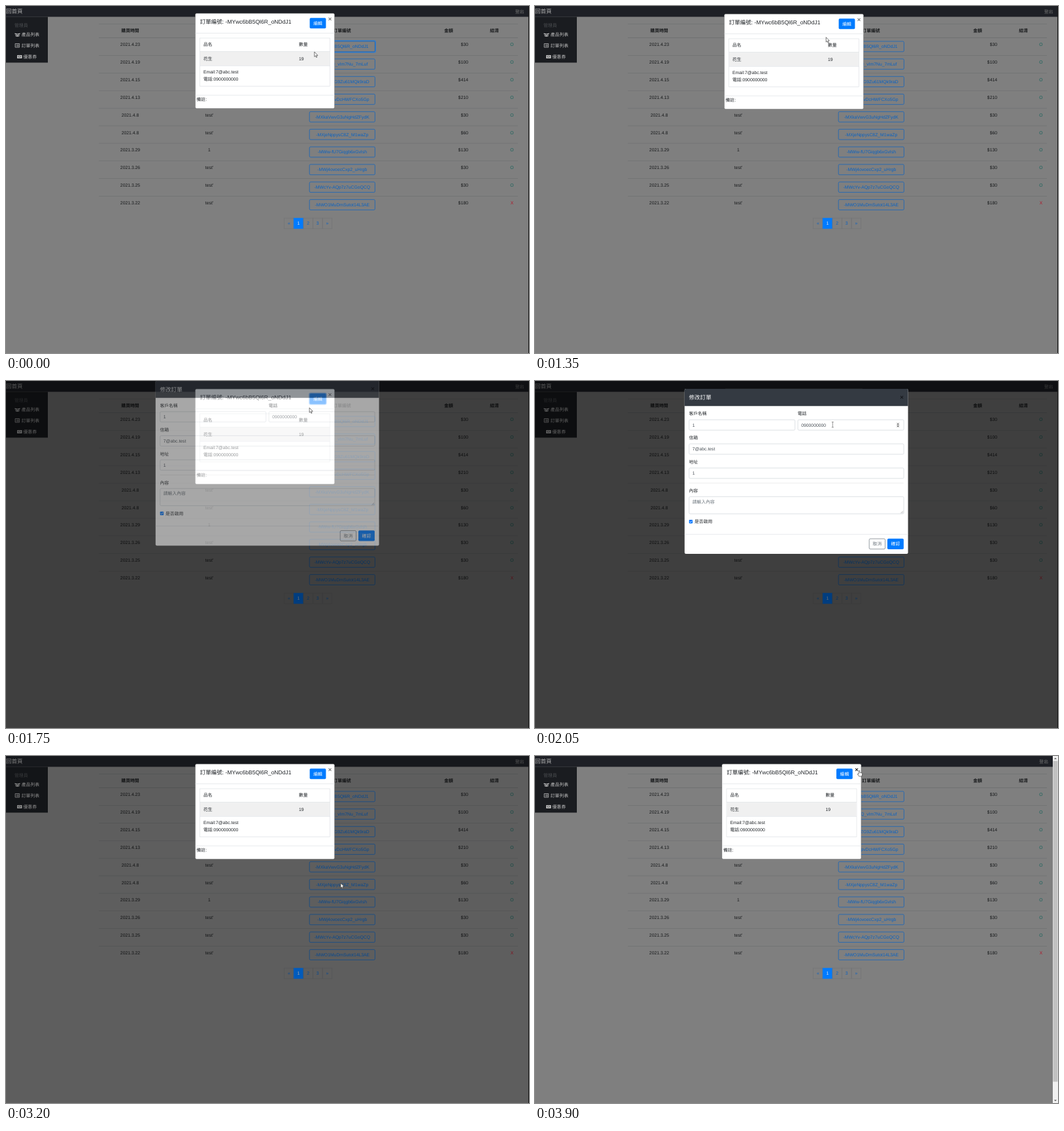
Recreate the animation shown at these times as an HTML page. Size 800 by 530 pixels, loop 3950 ms.

```html
<!DOCTYPE html>
<html lang="zh-Hant">
<head>
<meta charset="utf-8">
<title>訂單列表</title>
<style>
  html, body { margin: 0; width: 100%; height: 100%; overflow: hidden; background: #7f7f7f; }
  svg { display: block; width: 800px; height: 530px; }
  text { font: 6.82px 'Liberation Sans', 'Noto Sans CJK TC', 'Noto Sans CJK', sans-serif; text-rendering: geometricPrecision; }
</style>
</head>
<body>
<svg id="stage" viewBox="0 0 800 530"></svg>
<script>
const LOOP = 3950;
const BLUE = '#007bff', DIM_BLUE = '#0862c4', INK = '#212529', PAGE_INK = '#17191b';
const EMAIL = '7@abc.test', PHONE = '0900000000';

function add(parent, tag, attrs = {}) {
  const node = document.createElementNS('http://www.w3.org/2000/svg', tag);
  for (const key in attrs) node.setAttribute(key, attrs[key]);
  return parent.appendChild(node);
}
const group = parent => add(parent, 'g');
const rect = (parent, x, y, width, height, fill, attrs) =>
  add(parent, 'rect', { x, y, width, height, fill, ...attrs });
const box = (parent, x, y, w, h, stroke, fill = 'none') =>
  rect(parent, x, y, w, h, fill, { stroke, 'stroke-width': .7, rx: 1.7 });
const hline = (parent, x, y, w, color, h = .7) => rect(parent, x, y, w, h, color);
const path = (parent, d, attrs) => add(parent, 'path', { d, ...attrs });

// y is the vertical centre of the glyphs
function label(parent, x, y, string, fill = INK, { size = 6.82, anchor = 'start', weight = 400 } = {}) {
  const node = add(parent, 'text', { x, y: y + size * .36, fill, 'text-anchor': anchor });
  node.style.fontSize = size + 'px';
  node.style.fontWeight = weight;
  node.textContent = string;
  return node;
}
const middle = { anchor: 'middle' }, bold = { anchor: 'middle', weight: 700 };
const medium = { anchor: 'middle', weight: 500 };

const stage = document.getElementById('stage');
const page = group(stage);
rect(page, 0, 0, 800, 530, '#7f7f7f');

// Order table
const orders = [
  ['2021.4.23', '', '-MYwc6bB5Ql6R_oNDdJ1', 30],
  ['2021.4.19', '', '-MYbfCQ_vIm7Nu_7mLuf', 100],
  ['2021.4.15', '', '-MYKzAZG9Zu61MQk9raD', 414],
  ['2021.4.13', '', '-MY8s_tpvDcHWFCXo5Gp', 210],
  ['2021.4.8', "test'", '-MXkaVwvG3uNgHdZFydK', 30],
  ['2021.4.8', "test'", '-MXjeNppysC8Z_M1waZp', 60],
  ['2021.3.29', '1', '-MWw-fU7Giqgb6xGvIsh', 130],
  ['2021.3.26', "test'", '-MWj4ovoecCxp2_uHrgb', 30],
  ['2021.3.25', "test'", '-MWcYv-AQp7z7uCGoQCQ', 30],
  ['2021.3.22', "test'", '-MWO1MuDmSutot14L3AE', 180],
];
const LINE = '#6f7172';
hline(page, 142, 27, 641, LINE);
hline(page, 142, 48, 641, LINE, 1);
[['購買時間', 190], ['訂單編號', 514], ['金額', 677], ['結清', 747]]
  .forEach(([title, x]) => label(page, x, 38, title, PAGE_INK, bold));
const rowFocus = rect(page, 463.3, 53, 102, 17.8, 'none', { rx: 2, stroke: BLUE, 'stroke-width': 1.5 });
orders.forEach(([date, buyer, id, price], i) => {
  const y = 58.8 + 26.85 * i;
  const paid = i < 9;
  if (i) hline(page, 142, y - 10.4, 641, LINE);
  label(page, 190, y, date, PAGE_INK, middle);
  label(page, 311, y, buyer, PAGE_INK, middle);
  box(page, 464.2, y - 4.8, 100.2, 15.8, DIM_BLUE);
  label(page, 514.3, y + 3.1, id, DIM_BLUE, middle);
  label(page, 707, y, '$' + price, PAGE_INK, { anchor: 'end' });
  label(page, 774, y, paid ? 'O' : 'X', paid ? '#14635a' : '#b0182a', middle);
});

// Pagination
['«', '1', '2', '3', '»'].forEach((mark, i) => {
  const active = i === 1, x = 425.5 + 14.65 * i;
  rect(page, x, 324, 14.65, 16, active ? BLUE : 'none', { stroke: active ? BLUE : '#707274', 'stroke-width': .6 });
  label(page, x + 7.3, 332, mark, active ? '#e8e8e8' : DIM_BLUE, middle);
});

// Navigation
rect(page, 0, 0, 800, 16.5, '#1e2026');
label(page, 0, 8.3, '回首頁', '#aaa', { size: 8.53 });
const logout = label(page, 785.5, 8.3, '登出', '#777', middle);
rect(page, 0, 16.5, 64, 70, '#1a1c20');
label(page, 13, 29.5, '管理員', '#4b4d50');
label(page, 23.8, 43.5, '產品列表', '#c4c4c4', { weight: 500 });
label(page, 23.8, 60.5, '訂單列表', '#c4c4c4', { weight: 500 });
label(page, 26.5, 77.5, '優惠券', '#c4c4c4', { weight: 500 });
path(page, 'M13.5 41.5l4 1 4-1v1.6l-3 1-1-1-1 1-3-1zM14.5 44.5l2 .6 1-1 1 1 2-.6v1.5l-3 .8-3-.8z', { fill: '#c4c4c4' });
path(page, 'M14 57.5h6.6v5.6H14zM15.2 59h.9m.8 0h2.6M15.2 60.4h.9m.8 0h2.6M15.2 61.8h.9m.8 0h2.6', { fill: 'none', stroke: '#c4c4c4', 'stroke-width': .7 });
rect(page, 17, 75, 7.5, 5, '#c4c4c4', { rx: .6 });
rect(page, 18.8, 76.3, 3.9, 2.4, 'none', { stroke: '#1a1c20', 'stroke-width': .5 });

const backdrop = rect(page, 0, 0, 800, 530, '#000');
const edge = rect(stage, 799, 0, 1, 530, '#111');

// Scrollbar
const scrollbar = group(stage);
rect(scrollbar, 792, 0, 8, 530, '#f1f1f1');
rect(scrollbar, 792.5, 7.5, 7, 490, '#c1c1c1');
path(scrollbar, 'M794 4.8l2-2 2 2zM794 525.2l2 2 2-2z', { fill: '#555' });

// Order details dialog
const details = group(stage);
rect(details, 289.6, 12.2, 212.9, 145.3, '#fff', { rx: 2, stroke: '#666', 'stroke-width': .4 });
label(details, 296.8, 25.3, '訂單編號: -MYwc6bB5Ql6R_oNDdJ1', INK, { size: 8.53 });
const editFocus = rect(details, 463.2, 17.8, 27.4, 18.6, '#80bdff', { rx: 3 });
const editButton = rect(details, 464.6, 19.2, 24.8, 16, BLUE, { rx: 1.7 });
label(details, 477, 27.2, '編輯', '#fff', medium);
const closeMark = label(details, 495.6, 20.3, '×', '#777', { ...bold, size: 9.5 });
hline(details, 289.6, 42, 212.9, '#dee2e6');
rect(details, 296.6, 50, 199, 73.4, 'none', { stroke: '#dee2e6', 'stroke-width': .7 });
rect(details, 297, 70.6, 198.2, 21.4, '#f0f0f0');
hline(details, 296.6, 70.3, 199, '#dee2e6');
hline(details, 296.6, 91.9, 199, '#dee2e6');
label(details, 302, 60, '品名', INK, { weight: 500 });
label(details, 448, 60, '數量', INK, { weight: 500 });
label(details, 302, 81.4, '花生');
label(details, 448, 81.4, '19');
label(details, 302, 102, 'Email:' + EMAIL);
label(details, 302, 112.3, '電話:' + PHONE);
hline(details, 289.6, 136.8, 212.9, '#dee2e6');
label(details, 291.5, 143.7, '備註:');

// Edit dialog
const editor = group(stage);
const FIELD = '#ced4da', FIELD_INK = '#495057';
rect(editor, 228.8, 12, 341.8, 252, '#fff', { rx: 2 });
path(editor, 'M228.8 38.3V14q0-2 2-2h337.8q2 0 2 2v24.3z', { fill: '#343a42' });
label(editor, 235.6, 25, '修改訂單', '#fff', { size: 8.53 });
label(editor, 561, 24.5, '×', '#17191d', { ...bold, size: 9.5 });
function field(x, y, w, title, value) {
  label(editor, x, y, title);
  box(editor, x + .3, y + 9.2, w, 15.9, FIELD);
  label(editor, x + 5.4, y + 17.2, value, FIELD_INK);
}
field(235.4, 50, 162, '客戶名稱', '1');
field(401.8, 50, 162, '電話', PHONE);
field(235.4, 86.8, 328.4, '信箱', EMAIL);
field(235.4, 123.7, 328.4, '地址', '1');
const spinner = group(editor);
rect(spinner, 552.5, 63, 5.5, 8.6, '#eee');
path(spinner, 'M553.6 66.4l1.6-2 1.6 2zM553.6 68.2l1.6 2 1.6-2z', { fill: '#444' });
hline(editor, 235.6, 155.6, 328.2, '#e5e5e5');
label(editor, 235.4, 167.7, '內容');
box(editor, 235.7, 176.7, 328.4, 26.2, FIELD);
label(editor, 240.8, 184.3, '請輸入內容', '#6c757d');
path(editor, 'M559.5 202l3.5-3.5M561.5 202l1.5-1.5', { stroke: '#777', 'stroke-width': .5 });
rect(editor, 235.7, 212, 5.4, 5.4, '#0075ff', { rx: .8 });
path(editor, 'M236.9 214.8l1.2 1.2 2-2.6', { fill: 'none', stroke: '#fff', 'stroke-width': .8 });
label(editor, 244, 214.6, '是否啟用');
hline(editor, 228.8, 233.8, 341.8, '#dee2e6');
const cancelFocus = rect(editor, 509.6, 239.5, 27.6, 18.6, '#b5babe', { rx: 3 });
const cancelButton = box(editor, 511.2, 241, 24.4, 15.7, '#6c757d');
const cancelLabel = label(editor, 523.4, 248.8, '取消', '#6c757d', middle);
rect(editor, 539, 240.7, 24.9, 16.2, BLUE, { rx: 1.7 });
label(editor, 551.4, 248.8, '確認', '#fff', medium);

// Pointer shapes, each with its hot spot at 0,0
const outline = { fill: '#fff', stroke: '#222', 'stroke-width': .6, 'stroke-linejoin': 'round' };
const pointer = group(stage);
const shapes = {
  arrow: path(pointer, 'M0 0V7.4L1.7 5.9 2.8 8.5 4 8 2.9 5.4H5.1z', outline),
  beam: path(pointer, 'M-1.5-4H1.5M0-4V4M-1.5 4H1.5', { fill: 'none', stroke: '#555', 'stroke-width': .6 }),
  hand: path(pointer, 'M-.8.6Q0-.5.8.6V3.4L4 4Q4.8 4.2 4.7 5L4 9H-.4L-2.8 5.7Q-2.4 4.5-.8 5.6z', outline),
};
const route = [
  [0, 472, 70, 'arrow'], [250, 420, 84, 'arrow'], [500, 325, 105, 'beam'], [650, 308, 107, 'beam'],
  [900, 340, 108, 'beam'], [1100, 390, 90, 'arrow'], [1450, 467, 31, 'hand'], [1670, 467, 31, 'arrow'],
  [1950, 457, 65, 'beam'], [2250, 452, 70, 'beam'], [2450, 470, 150, 'arrow'], [2700, 522.5, 247, 'hand'],
  [3060, 522.5, 247, 'hand'], [3130, 518, 220, 'arrow'], [3200, 512, 194.5, 'arrow'],
  [3450, 506, 120, 'arrow'], [3750, 496, 22, 'hand'], [LOOP, 496, 22, 'hand'],
];

const clamp = v => Math.min(1, Math.max(0, v));
const ramp = (t, start, length) => clamp((t - start) / length);
const easeOut = p => 1 - (1 - p) ** 1.7;
const show = (node, on) => node.setAttribute('visibility', on ? 'visible' : 'hidden');
const move = (node, x, y) => node.setAttribute('transform', `translate(${x} ${y})`);

function movePointer(t) {
  const next = route.findIndex(stop => stop[0] > t);
  const [t0, x0, y0, kind] = route[next - 1], [t1, x1, y1] = route[next];
  const p = (t - t0) / (t1 - t0);
  move(pointer, x0 + (x1 - x0) * p, y0 + (y1 - y0) * p);
  for (const name in shapes) show(shapes[name], name === kind);
}

function render(t) {
  const scrolling = t >= 3350;
  const hoverEdit = t >= 1450 && t < 1670, hoverCancel = t >= 2700;

  backdrop.setAttribute('opacity', .5 * (ramp(t, 1550, 100) - ramp(t, 3130, 150)));
  rowFocus.setAttribute('opacity', .6 * (1 - ramp(t, 0, 100)));
  show(scrollbar, scrolling);
  show(edge, !scrolling);
  move(logout, scrolling ? -7.3 : 0, 0);

  move(details, scrolling ? -3.6 : 0, t < 50 ? -1 : 0);
  show(editFocus, t >= 1530 && t < 1820);
  editButton.setAttribute('fill', hoverEdit ? '#0069d9' : BLUE);
  closeMark.setAttribute('fill', t >= 3750 ? '#222' : '#777');

  const entering = easeOut(ramp(t, 1670, 300)), leaving = easeOut(ramp(t, 2980, 300));
  editor.setAttribute('opacity', ramp(t, 1670, 150) - ramp(t, 2980, 150));
  move(editor, 0, -21.3 * (1 - entering + leaving));
  show(spinner, t >= 1950 && t < 2350);
  show(cancelFocus, t >= 2940);
  cancelButton.setAttribute('fill', hoverCancel ? '#6c757d' : 'none');
  cancelLabel.setAttribute('fill', hoverCancel ? '#fff' : '#6c757d');

  movePointer(t);
}

const began = performance.now();
function tick() {
  render((performance.now() - began) % LOOP);
  requestAnimationFrame(tick);
}
tick();
</script>
</body>
</html>
```
